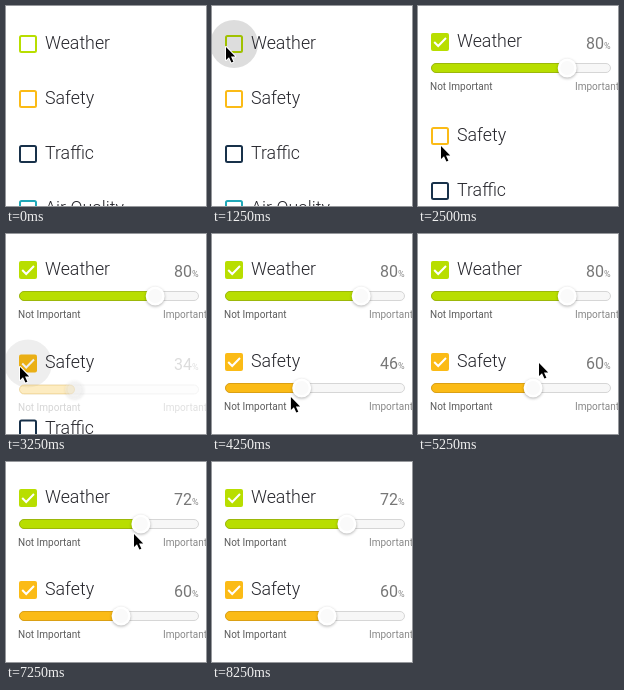
Recreate the animation shown at these times as an HTML page with a canvas. Size 200 by 200 pixels, loop 9 s.

```html
<!DOCTYPE html>
<html lang="en">
<head>
<meta charset="utf-8">
<title>Importance sliders</title>
<style>
html, body { margin: 0; width: 100%; height: 100%; overflow: hidden; background: #fff; }
canvas { display: block; width: 200px; height: 200px; }
</style>
</head>
<body>
<canvas id="stage" width="200" height="200"></canvas>
<script>
const canvas = document.getElementById('stage');
const ctx = canvas.getContext('2d');
const ratio = window.devicePixelRatio || 1;
canvas.width = canvas.height = 200 * ratio;

const LOOP = 9000, STEP = 250;
const FONT = 'Roboto, "Open Sans", sans-serif';

// Key points: time, x, y.
const pointer = [
  [500, 57, 48], [1000, 14, 41], [1750, 14, 41], [2500, 23, 140],
  [2750, 14, 133], [3250, 14, 133], [4000, 58, 163], [4550, 104, 163],
  [5250, 121, 129], [5650, 142, 72], [6500, 59, 72], [7250, 128, 72],
  [7750, 119, 91], [8000, 47, 109]
];

// tap: when the box is checked; value: key points of time and percent.
const rows = [
  { label: 'Weather', color: '#b8de00', edge: '#9cb80a', x0: 6, tap: 1500,
    value: [[5650, 80], [6500, 33], [7250, 72]] },
  { label: 'Safety', color: '#fbbb16', edge: '#dba014', x0: 7.7, tap: 3000,
    value: [[4000, 34], [4550, 60]] },
  { label: 'Traffic', color: '#18314a', tap: Infinity },
  { label: 'Air Quality', color: '#20a8b8', tap: Infinity }
];

// Linear interpolation between key points, held at both ends.
function sample(track, t) {
  const i = track.findIndex(p => t < p[0]);
  if (i < 1) return track.at(i).slice(1);
  const a = track[i - 1], b = track[i];
  const k = (t - a[0]) / (b[0] - a[0]);
  return a.slice(1).map((v, n) => v + (b[n + 1] - v) * k);
}

function ramp(t, from, length) {
  if (t <= from) return 0;
  const k = Math.min(1, (t - from) / length);
  return k * k * (3 - 2 * k);
}

function text(str, x, y, size, weight, color, align = 'left') {
  ctx.font = `${weight} ${size}px ${FONT}`;
  ctx.fillStyle = color;
  ctx.textAlign = align;
  ctx.fillText(str, x, y);
}

function pill(x, y, w, h, r, fill, stroke, line = 1) {
  ctx.beginPath();
  ctx.roundRect(x, y, w, h, r);
  if (fill) {
    ctx.fillStyle = fill;
    ctx.fill();
  }
  if (stroke) {
    ctx.strokeStyle = stroke;
    ctx.lineWidth = line;
    ctx.stroke();
  }
}

function disc(x, y, r, color) {
  ctx.beginPath();
  ctx.arc(x, y, r, 0, Math.PI * 2);
  ctx.fillStyle = color;
  ctx.fill();
}

function checkbox(y, color, checked) {
  if (!checked) {
    pill(14, y - 8, 16, 16, 1.5, null, color, 2);
    return;
  }
  pill(13, y - 9, 18, 18, 2, color);
  ctx.beginPath();
  ctx.moveTo(16.2, y);
  ctx.lineTo(20.2, y + 4);
  ctx.lineTo(28, y - 4);
  ctx.strokeStyle = '#fff';
  ctx.lineWidth = 2;
  ctx.stroke();
}

function slider(row, y, value) {
  const x = row.x0 + 1.79 * value;
  pill(13.5, y - 4.5, 179, 9, 4.5, '#f7f7f7', '#d6d6d6');
  pill(13.5, y - 4.5, x - 13.5, 9, 4.5, row.color, row.edge);

  ctx.save();
  ctx.shadowColor = 'rgba(0,0,0,.3)';
  ctx.shadowBlur = 3 * ratio;
  ctx.shadowOffsetY = ratio;
  disc(x, y, 9.5, '#fff');
  ctx.restore();
  disc(x, y, 7, '#fafafa');
}

function drawRow(row, base, open, t) {
  const y = base - 2 * open;
  checkbox(y, row.color, open > 0);
  const press = ramp(t, row.tap - 500, 250) - ramp(t, row.tap, 500);
  if (press > 0) disc(22, y, 24, `rgba(0,0,0,${.135 * press})`);
  text(row.label, 39, y + 5, 17.8, 300, '#26262c');
  if (!open) return;

  const [value] = sample(row.value, t);
  ctx.save();
  ctx.globalAlpha = open;
  slider(row, y + 26, value);
  text(Math.round(value), 186, y + 7, 16, 400, '#777', 'right');
  text('%', 186, y + 7, 9, 400, '#888');
  text('Not Important', 12, y + 48, 10, 400, '#5c5c5c');
  text('Important', 157, y + 48, 10, 400, '#888');
  ctx.restore();
}

function arrow([x, y]) {
  ctx.save();
  ctx.translate(x, y);
  ctx.beginPath();
  const outline = [[0, 0], [0, 13], [3, 10.2], [5.4, 15.6], [7.4, 14.7], [5, 9.4], [9.2, 9.4]];
  outline.forEach(p => ctx.lineTo(...p));
  ctx.closePath();
  ctx.lineJoin = 'round';
  ctx.lineWidth = 2;
  ctx.strokeStyle = '#fff';
  ctx.stroke();
  ctx.fillStyle = '#000';
  ctx.fill();
  ctx.restore();
}

function draw(t) {
  ctx.setTransform(ratio, 0, 0, ratio, 0, 0);
  ctx.fillStyle = '#fff';
  ctx.fillRect(0, 0, 200, 200);
  let y = 38;
  for (const row of rows) {
    const open = ramp(t, row.tap, 750);
    drawRow(row, y, open, t);
    y += 55 + 37 * open;
  }
  if (t >= 500 && t < 8250) arrow(sample(pointer, t));
}

function tick() {
  const t = performance.now() % LOOP;
  draw(Math.floor(t / STEP) * STEP);
  requestAnimationFrame(tick);
}
tick();
</script>
</body>
</html>
```
